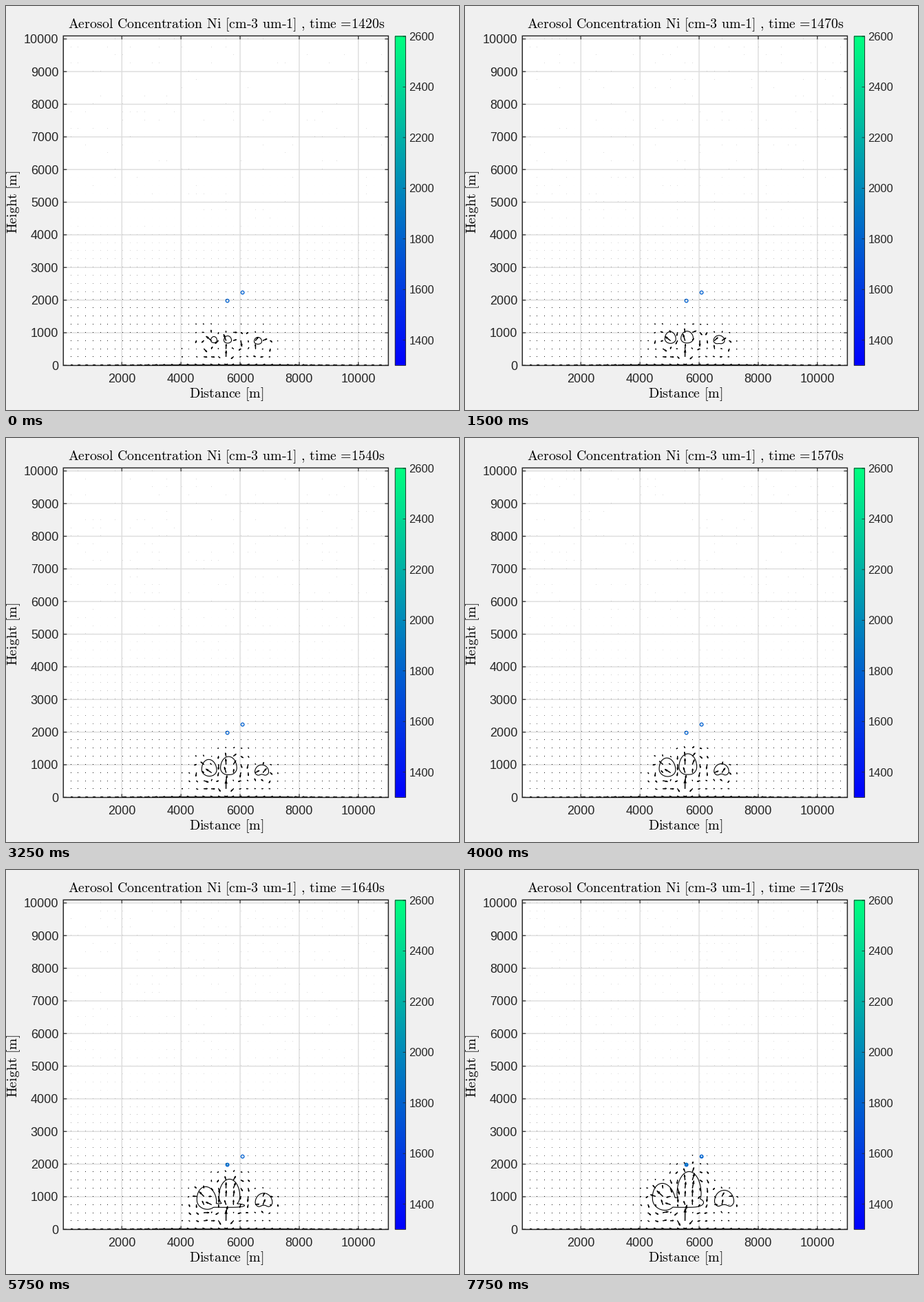
A matplotlib script for the animation above (8 s loop, 658 by 586 pixels).

```python
import numpy as np
import matplotlib.pyplot as plt
from matplotlib.animation import FuncAnimation
from matplotlib.collections import LineCollection, PolyCollection
from matplotlib.patches import Circle, Rectangle

W, H, DPI = 658, 586, 64
PX = 72 / DPI                      # one pixel in points
STEPS, INTERVAL = 32, 250
LEFT, RIGHT, TOP, BOTTOM = 83.3, 555.4, 43.4, 521.4
BAR_LEFT, BAR_RIGHT = 565.2, 580.6
INK = "#262626"
TITLE = "Aerosol Concentration Ni [cm-3 um-1] , time =%ds"

plt.rcParams["font.family"] = "Liberation Sans"
plt.rcParams["mathtext.fontset"] = "cm"

fig = plt.figure(figsize=(W / DPI, H / DPI), dpi=DPI, facecolor="#f0f0f0")
ax = fig.add_axes([0, 0, 1, 1])
ax.imshow(np.linspace(1, 0, 256)[:, None], cmap="winter", aspect="auto",
          extent=(BAR_LEFT, BAR_RIGHT, BOTTOM, 44), interpolation="nearest")
ax.set_xlim(0, W)
ax.set_ylim(H, 0)
ax.set_autoscale_on(False)
ax.axis("off")


def to_x(metres):
    return 82.4 + 0.04294 * metres


def to_y(metres):
    return 521.3 - 0.04735 * metres


def line(x0, y0, x1, y1, color=INK, width=1.2, z=6):
    ax.plot([x0, x1], [y0, y1], color=color, lw=width * PX, zorder=z,
            solid_capstyle="butt", snap=False)


def box(x0, y0, x1, y1, width):
    ax.add_patch(Rectangle((x0, y0), x1 - x0, y1 - y0, fc="none", ec=INK,
                           lw=width * PX, zorder=6, snap=False))


def latex(x, y, words, **style):
    return ax.text(x, y, r"$\text{%s}$" % words, fontsize=19.87 * PX, ha="center",
                   va="baseline", color="black", **style)


def label(x, y, value, ha, size=18):
    ax.text(x, y + 0.36 * size, str(value), fontsize=size * PX, ha=ha,
            va="baseline", color=INK)


# Axes, grid and colour bar
background = Rectangle((LEFT, TOP), RIGHT - LEFT, BOTTOM - TOP, fc="white", ec="none", zorder=0)
ax.add_patch(background)
for d in range(2000, 10001, 2000):
    x = to_x(d)
    line(x, TOP, x, BOTTOM, "#dcdcdc", 1.4, 1)
    line(x, BOTTOM, x, BOTTOM - 5)
    line(x, TOP, x, TOP + 5)
    label(x, 539.5, d, "center")
for h in range(0, 10001, 1000):
    y = to_y(h)
    line(LEFT, y, RIGHT, y, "#dcdcdc", 1.4, 1)
    line(LEFT, y, LEFT + 5, y)
    line(RIGHT, y, RIGHT - 5, y)
    label(76.2, y, h, "right")
for c in range(1400, 2601, 200):
    y = BOTTOM - (c - 1300) * (BOTTOM - 44) / 1300
    line(BAR_RIGHT, y, BAR_RIGHT - 4, y, width=0.8)
    label(585.5, y, c, "left", 16.5)
box(LEFT, TOP, RIGHT, BOTTOM, 1.5)
box(BAR_LEFT, 44, BAR_RIGHT, BOTTOM, 0.9)

title = latex(320.3, 32.5, TITLE % 1420)
latex(320, 568.5, "Distance [m]")
latex(16.4, 283.8, "Height [m]", rotation=90, rotation_mode="anchor")

# Clouds: zero level of the union of growing domes
cloud_x, cloud_y = np.meshgrid(np.arange(255, 405, 0.5), np.arange(425, 505, 0.5))


def dome(cx, top, base, half_width, lean=0.0, notch=0.0):
    """Positive inside an egg with a flat underside, optionally notched from below."""
    middle = base - 0.38 * (base - top)
    rise = middle - cloud_y
    u = (cloud_x - cx + lean * rise) / half_width
    v = rise / np.where(rise > 0, middle - top, base - middle)
    gap = notch * np.exp(-(u / 0.38) ** 2 - ((cloud_y - base) / 5) ** 2)
    return 1 - u ** 2 - v ** 2 - gap


def cloud_field(step):
    p = step / 30
    g = p ** 0.7
    left = dome(301.5 - 13 * g, 479 - 25 * g, 488 + 5 * p, 4.5 + 12 * g, 0.1 * p)
    middle = dome(321.5 + 3.5 * p, 478 - 41 * p, 488.5, 5.5 + 12 * g, 0, 0.3 * p)
    right = dome(365.5 + 10.5 * g, 480 - 16 * p, 490, 5.5 + 8.5 * g, 0, 2.2 * p)
    thick = max(0.54 * (step - 17), 0.01)
    bridge = 1 - ((cloud_x - 317) / 29) ** 4 - ((cloud_y - 488.8 + thick) / thick) ** 2
    return np.maximum.reduce([left, middle, right, bridge])


# Wind field on a 250 m grid
gx, gh = (g.ravel() for g in np.meshgrid(np.arange(1, 44) * 250, np.arange(0, 41) * 250))
px, py = to_x(gx) + 1, to_y(gh) - 0.6
ground = gh == 0
rng = np.random.default_rng(4)
phase = rng.uniform(0, 2 * np.pi, px.size)
gust = rng.uniform(0.3, 1, px.size)


def plume(cx, cy, rx, ry, strength, tilt):
    """Vortex pair rising along an axis tilted from the vertical."""
    dx, dy = px - cx, cy - py
    c, s = np.cos(tilt), np.sin(tilt)
    a, b = c * dx - s * dy, s * dx + c * dy
    e = strength * np.exp(-(a / rx) ** 2 - (b / ry) ** 2)
    across, along = 2 * e * a * b / ry ** 2, e * (1 - 2 * (a / rx) ** 2)
    return np.array([across * c + along * s, along * c - across * s])


def wind(step):
    p = step / 30
    dx = px - 320
    side = np.tanh(dx / 25)
    near = np.exp(-(dx / 70) ** 2)
    inflow = (1.2 + 5 * np.exp(-(dx / 55) ** 2)) * np.exp(-gh / 330)
    outflow = 2.2 * near * np.exp(-((py - 464 + 10 * p) / 18) ** 2)
    swirl = 3.6 * gust * np.exp(-(dx / 68) ** 2 - ((py - 490) / 22) ** 2)
    turn = phase + 1.2 * p
    flow = np.array([side * (outflow - inflow) + swirl * np.cos(turn),
                     0.5 * near * np.exp(-gh / 1500) + swirl * np.sin(turn)])
    flow += plume(299 - 10 * p, 486 - 9 * p, 15 + 4 * p, 13 + 6 * p, 10 + 4 * p, -0.6 - 0.2 * p)
    flow += plume(322 + 3 * p, 487 - 24 * p, 15 + 3 * p, 13 + 17 * p, 11 + 4 * p, 0.05)
    flow += plume(320, 506, 10, 11, 8 + 9 * p, 0)
    flow += plume(364 + 10 * p, 489 - 11 * p, 15, 13, 9 - p, 0.6)
    surface = -np.tanh(dx / 8) * (2.6 + 13 * np.exp(-(dx / 125) ** 2))
    u, v = np.where(ground, [surface, 0 * dx], flow)
    return np.column_stack([u, -v])


def arrows(step):
    flow = wind(step)
    size = np.hypot(*flow.T)
    keep = size > 1.1
    tail = np.column_stack([px, py])[keep]
    flow, size = flow[keep], size[keep, None]
    tip, way = tail + flow, flow / size
    normal = way[:, ::-1] * [-1, 1]
    head = np.clip(0.38 * size, 2.2, 5)
    neck = tip - head * way
    heads = np.stack([tip, neck + 0.38 * head * normal, neck - 0.38 * head * normal], axis=1)
    widths = np.where(ground[keep], 2, 1.5) * PX
    return np.stack([tail, tip], axis=1), widths, heads[size[:, 0] > 3]


def dot_colors(step):
    p = step / 30
    alpha = 0.9 * np.exp(-np.maximum(gh - 1700, 0) / (1100 + 500 * p))
    shown = np.random.default_rng(100 + step).random(px.size) < 0.12 + 0.33 * p
    sparse = np.where(shown, np.maximum(alpha, 0.14), 0.3 * alpha)
    rgba = np.zeros((px.size, 4))
    rgba[:, 3] = np.where(gh > 4000, sparse, alpha)
    return rgba


dots = ax.scatter(np.floor(px) + 0.5, np.floor(py) + 0.5, marker="s", linewidths=0, zorder=3,
                  s=((1 + 0.6 * np.exp(-gh / 1000)) * PX) ** 2)
shafts = LineCollection([], colors="black", zorder=4)
heads = PolyCollection([], facecolors="black", edgecolors="black", linewidths=0.5 * PX, zorder=4)
for artist in (shafts, heads):
    ax.add_collection(artist, autolim=False)
    artist.set_clip_path(background)


def ring(x, y, radius, color, width):
    return ax.add_patch(Circle((x, y), radius, fc="none", ec=color, lw=width * PX, zorder=5))


ring(321.6, 427.6, 2.3, "#0060cf", 1.3)
ring(343.6, 415.6, 2.3, "#0060cf", 1.3)
core_a = ring(321.6, 427.1, 1.4, "#0072c6", 1)
core_b = ring(343.6, 415.1, 1.6, "#0064cd", 1)
outlines = []


def update(index):
    step = max(index - 1, 0)
    title.set_text(r"$\text{%s}$" % (TITLE % (1420 + 10 * step)))
    dots.set_facecolors(dot_colors(step))
    lines, widths, tips = arrows(step)
    shafts.set_segments(lines)
    shafts.set_linewidths(widths)
    heads.set_verts(tips)
    while outlines:
        outlines.pop().remove()
    outlines.append(ax.contour(cloud_x + 0.5, cloud_y + 0.5, cloud_field(step), levels=[0],
                               colors="black", linewidths=1.1 * PX, zorder=5))
    core_a.set_visible(step >= 20)
    core_a.set_linewidth((1 + 0.08 * max(step - 20, 0)) * PX)
    core_b.set_visible(step >= 26)
    return title, dots, shafts, heads, core_a, core_b


animation = FuncAnimation(fig, update, frames=STEPS, interval=INTERVAL, repeat=True,
                          repeat_delay=0, blit=False)
plt.show()
```
